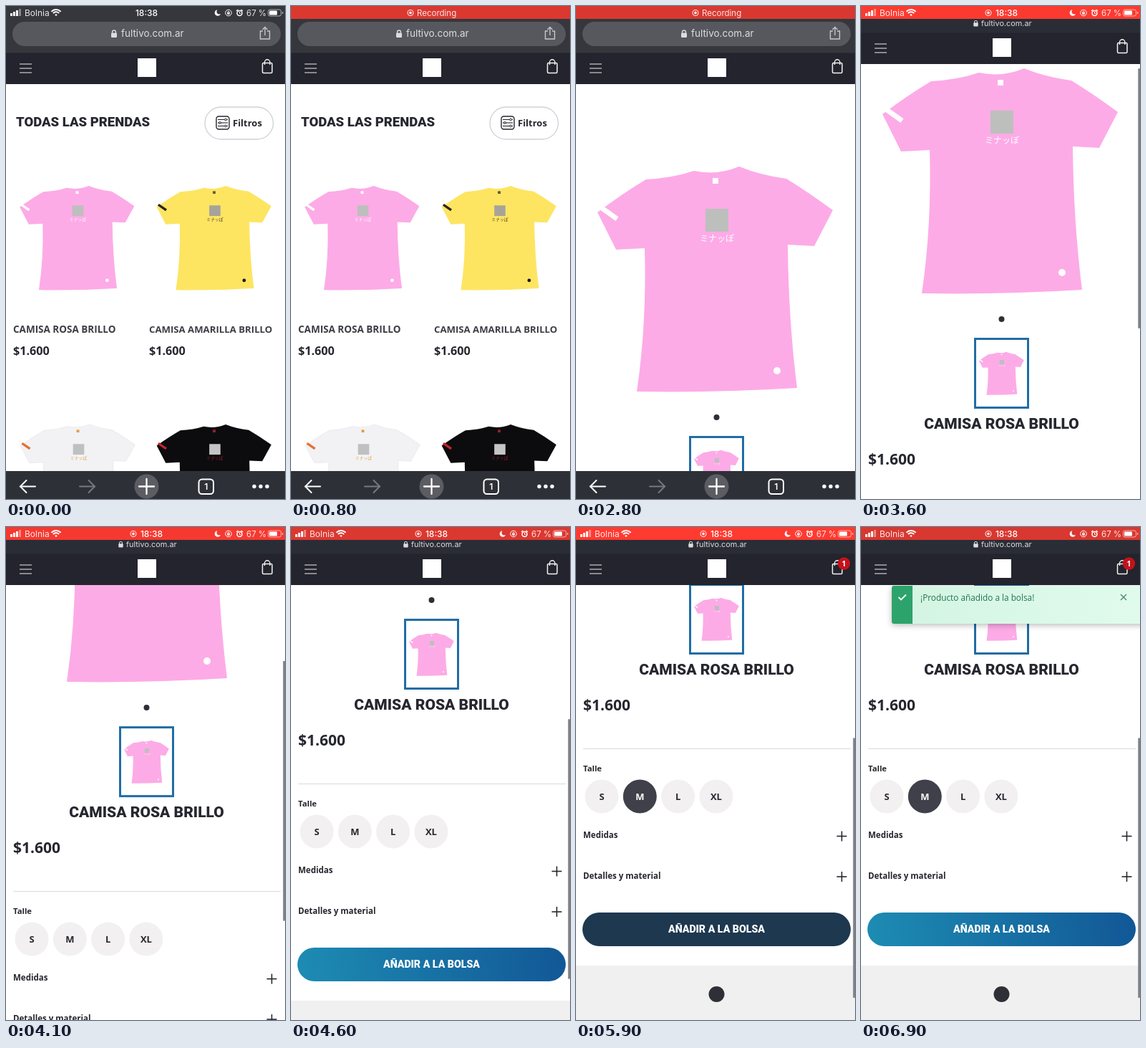
Write an HTML page with a canvas that moves like this. It is 390 px wide and 688 px high and loops after 7 s.

```html
<!DOCTYPE html>
<html lang="es">
<head>
<meta charset="utf-8">
<title>Tienda</title>
<style>
html, body { margin: 0; width: 100%; height: 100%; overflow: hidden; background: #fff; }
canvas { display: block; width: 390px; height: 688px; }
</style>
</head>
<body>
<canvas id="stage"></canvas>
<script>
const W = 390, H = 688, LOOP = 7000;
const canvas = document.getElementById('stage');
const dpr = window.devicePixelRatio || 1;
canvas.width = W * dpr;
canvas.height = H * dpr;
const c = canvas.getContext('2d');

const INK = '#26272f', BAR = '#35373d', HEADER = '#23242d', SOFT = 'rgba(255,255,255,.87)';
const UI = 'Inter, sans-serif', BODY = '"Open Sans", sans-serif';
const HEAD = 'Roboto, sans-serif', KANA = '"Noto Sans CJK JP", "Noto Sans CJK", sans-serif';

const times = {
  recording: 600, blank: 1400, product: 2300, clock: 3150,
  size: 5200, press: 5600, badge: 5800, release: 6100, toast: 6200
};
const scrolls = [[2950, 3500, 137], [3700, 4450, 335], [4700, 5050, 49]];

const clamp = v => Math.max(0, Math.min(1, v));
const mix = (a, b, k) => a + (b - a) * k;
const ease = (t, from, to) => {
  const k = clamp((t - from) / (to - from));
  return k * k * (3 - 2 * k);
};

function rect(x, y, w, h, color) {
  c.fillStyle = color;
  c.fillRect(x, y, w, h);
}
function round(x, y, w, h, r, fill, stroke, width = 1) {
  c.beginPath();
  c.roundRect(x, y, w, h, r);
  paint(fill, stroke, width);
}
function disc(x, y, r, fill, stroke, width = 1) {
  c.beginPath();
  c.arc(x, y, r, 0, Math.PI * 2);
  paint(fill, stroke, width);
}
function paint(fill, stroke, width) {
  if (fill) { c.fillStyle = fill; c.fill(); }
  if (stroke) { c.strokeStyle = stroke; c.lineWidth = width; c.stroke(); }
}
function line(color, width, ...points) {
  c.beginPath();
  points.forEach(([x, y], i) => i ? c.lineTo(x, y) : c.moveTo(x, y));
  paint(null, color, width);
}
function text(str, x, y, font, color = INK, align = 'left') {
  c.font = font;
  c.fillStyle = color;
  c.textAlign = align;
  c.textBaseline = 'alphabetic';
  c.fillText(str, x, y);
}
function plus(x, y, r, color, width) {
  line(color, width, [x - r, y], [x + r, y]);
  line(color, width, [x, y - r], [x, y + r]);
}

// Origin: centre of the garment, at the top of its collar.
function shirt(x, y, scale, look, scaleY = scale) {
  c.save();
  c.translate(x, y);
  c.scale(scale, scaleY);
  c.beginPath();
  c.moveTo(-30, 7);
  c.quadraticCurveTo(2, 14, 33, 1);
  c.quadraticCurveTo(62, 13, 99, 18);
  c.quadraticCurveTo(130, 37, 164, 62);
  c.lineTo(138, 112);
  c.lineTo(101, 110);
  c.quadraticCurveTo(102, 215, 114, 310);
  c.quadraticCurveTo(0, 317, -110, 315);
  c.quadraticCurveTo(-96, 220, -99, 115);
  c.lineTo(-139, 117);
  c.lineTo(-165, 65);
  c.quadraticCurveTo(-129, 38, -97, 19);
  c.quadraticCurveTo(-60, 17, -30, 7);
  c.closePath();
  paint(look.cloth, look.edge, 1.5);
  rect(-4, 17, 8, 8, look.tag);
  rect(-14, 60, 32, 32, look.mark);
  text('ミナッぽ', 2, 106, '500 12px ' + KANA, look.kana, 'center');
  c.save();
  c.translate(-149, 66);
  c.rotate(0.62);
  rect(-14, -3.5, 28, 7, look.sleeve);
  c.restore();
  disc(86, 286, 5, look.dot);
  c.restore();
}

const pink = {
  cloth: '#fcabe7', tag: '#fff', mark: '#bdbfbd',
  kana: '#fff', sleeve: '#fff', dot: '#fff'
};
const yellow = {
  cloth: '#fde562', tag: '#655b29', mark: '#a6a39b',
  kana: '#513e25', sleeve: '#29251e', dot: '#1d1c1a'
};
const white = {
  cloth: '#f2f2f5', edge: '#e6e6ea', tag: '#e0a13d', mark: '#bfc0c2',
  kana: '#e3a145', sleeve: '#e37035', dot: '#444'
};
const black = {
  cloth: '#0c0c0f', tag: '#9c2028', mark: '#c5c5c6',
  kana: '#9d1821', sleeve: '#c3242c', dot: '#fff'
};

function listPage() {
  text('TODAS LAS PRENDAS', 14, 168, '900 18.5px ' + HEAD);
  round(278, 141, 95.5, 45, 22.5, '#fff', '#cfd0d7', 1.3);
  round(294, 154, 18, 18, 3.5, null, INK, 1.4);
  [[158.5, 307], [163, 299], [167.5, 307]].forEach(([y, knob]) => {
    line(INK, 1.1, [296, y], [310, y]);
    disc(knob, y, 1.4, '#fff', INK, 1);
  });
  text('Filtros', 317, 168, '700 13px ' + BODY);

  const wide = 0.487, tall = 0.463;
  shirt(99.5, 250.5, wide, pink, tall);
  shirt(291, 250.5, wide, yellow, tall);
  text('CAMISA ROSA BRILLO', 10, 456, '700 13.5px ' + BODY, '#3d3e46');
  text('CAMISA AMARILLA BRILLO', 200, 456, '700 13.2px ' + BODY, '#3d3e46');
  text('$1.600', 10, 487, '700 16.2px ' + BODY);
  text('$1.600', 200, 487, '700 16.2px ' + BODY);
  shirt(100.5, 583.5, wide, white, tall);
  shirt(291, 583.5, wide, black, tall);
}

function productPage(t, scroll) {
  c.save();
  c.translate(0, -scroll);
  shirt(195, 223, 1, pink);
  disc(196.5, 574, 4, '#2e2f36');
  rect(158, 600, 77, 99, '#216da5');
  rect(161, 603, 71, 93, '#fff');
  shirt(196.5, 619.5, 0.191, pink);
  text('CAMISA ROSA BRILLO', 196.5, 727, '900 21px ' + HEAD, INK, 'center');
  text('$1.600', 10, 777, '700 21px ' + BODY);
  rect(10, 830, 374, 1, '#d9d9dc');

  text('Talle', 10, 862, '700 11.3px ' + BODY);
  ['S', 'M', 'L', 'XL'].forEach((label, i) => {
    const x = 36 + i * 53.3, chosen = label === 'M' && t >= times.size;
    disc(x, 897, 23.5, chosen ? '#3f4049' : '#f2f0f0');
    text(label, x, 902, '700 13px ' + BODY, chosen ? '#fff' : INK, 'center');
  });
  [['Medidas', 951], ['Detalles y material', 1007.5]].forEach(([label, y]) => {
    text(label, 10, y + 4, '700 11.5px ' + BODY);
    plus(371.5, y + 1.5, 7, INK, 1.6);
  });

  const blue = c.createLinearGradient(9, 1106, 384, 1059);
  blue.addColorStop(0, '#1d8cb3');
  blue.addColorStop(1, '#125796');
  const pressed = t >= times.press && t < times.release;
  round(9, 1059, 375, 47, 23.5, pressed ? '#1e3850' : blue);
  text('AÑADIR A LA BOLSA', 196.5, 1086.5, '900 14.2px ' + HEAD, '#fff', 'center');
  rect(0, 1133, W, 200, '#f1f0f0');
  disc(196.5, 1173, 11, '#2f3037');
  c.restore();
}

function toast(t) {
  if (t < times.toast) return;
  const x = mix(W, 43, ease(t, times.toast, times.toast + 350));
  c.save();
  c.shadowColor = 'rgba(0,0,0,.28)';
  c.shadowBlur = 8;
  c.shadowOffsetY = 2;
  const mint = c.createLinearGradient(x, 0, x + 347, 0);
  mint.addColorStop(0, '#d3f4e2');
  mint.addColorStop(1, '#e0fbec');
  round(x, 82, 355, 53, 3, mint);
  c.restore();
  round(x, 82, 29, 53, [3, 0, 0, 3], '#2ca36b');
  line('#fff', 1.8, [x + 9.5, 98], [x + 13, 101.5], [x + 20, 94.5]);
  text('¡Producto añadido a la bolsa!', x + 40, 102.5, '400 11.8px ' + BODY, '#23744f');
  const cx = x + 324;
  line('#528b70', 1.5, [cx - 4, 94], [cx + 4, 102]);
  line('#528b70', 1.5, [cx + 4, 94], [cx - 4, 102]);
}

function padlock(x, y, s) {
  c.save();
  c.translate(x, y);
  c.scale(s, s);
  round(-4, -1, 8, 6.5, 1.2, '#dcdde0');
  c.beginPath();
  c.arc(0, -2, 2.5, Math.PI, 0);
  c.lineTo(2.5, 0);
  c.moveTo(-2.5, -2);
  c.lineTo(-2.5, 0);
  paint(null, '#dcdde0', 1.3);
  c.restore();
}

function addressBar(k) {
  rect(0, 18, W, 48 - 28 * k, k < 1 ? BAR : '#2b2d36');
  c.globalAlpha = 1 - k;
  round(9, 22, 375, 34 - 24 * k, 17 - 12 * k, '#56585d');
  const y = 38 - 14 * k;
  line('#c7c8cb', 1.4, [359, y - 3], [355.5, y - 3], [355.5, y + 8], [368.5, y + 8], [368.5, y - 3], [365, y - 3]);
  line('#c7c8cb', 1.4, [362, y + 3], [362, y - 8]);
  line('#c7c8cb', 1.4, [358.5, y - 5], [362, y - 8.5], [365.5, y - 5]);
  c.globalAlpha = 1;
  padlock(mix(151, 160.5, k), mix(38.5, 24, k), mix(1, 0.8, k));
  text('fultivo.com.ar', mix(161, 168, k), mix(43, 28, k), `400 ${mix(13.5, 10.9, k)}px ${UI}`, '#dcdde0');
}

function header(t, k) {
  c.save();
  c.translate(0, -28 * k);
  rect(0, 65.5, W, 43.5, HEADER);
  [81, 87, 93].forEach(y => line('#dcdde0', 1.1, [19, y], [36, y]));
  rect(184, 73, 26, 26, '#fff');
  round(358.5, 79.5, 13.5, 14, 1.5, null, '#f2f2f3', 1.5);
  c.beginPath();
  c.moveTo(361.5, 82);
  c.lineTo(361.5, 78.5);
  c.arc(365.2, 78.5, 3.7, Math.PI, 0);
  c.lineTo(368.9, 82);
  paint(null, '#f2f2f3', 1.4);
  if (t >= times.badge) {
    disc(374.5, 79, 8.7, '#c5121b');
    text('1', 374.5, 83, '700 10.5px ' + BODY, '#fff', 'center');
  }
  c.restore();
}

function recordIcon(x) {
  disc(x, 9.5, 4, null, SOFT, 1.1);
  disc(x, 9.5, 1.9, SOFT);
}

function statusIcons(bg, clockX) {
  [4, 6, 8, 10].forEach((h, i) =>
    rect(6 + i * 4, 14 - h, 3, h, i < 3 ? '#fff' : 'rgba(255,255,255,.4)'));
  text('Bolnia', 26, 13.8, '400 12px ' + UI, SOFT);
  [2.5, 5.7, 9].forEach(r => {
    c.beginPath();
    c.arc(70, 14, r, -Math.PI * 0.76, -Math.PI * 0.24);
    if (r < 3) { c.lineTo(70, 14); paint('#fff'); } else paint(null, '#fff', 1.9);
  });
  text('18:38', clockX, 13.8, '500 12px ' + UI, '#fff', 'center');
  disc(296, 9.5, 4.3, '#fff');
  disc(298.3, 7.8, 3.8, bg);
  disc(311, 9.5, 4.3, null, '#fff', 1);
  rect(309.3, 8.8, 3.4, 3, '#fff');
  disc(311, 8.7, 1.3, null, '#fff', 0.8);
  disc(326.5, 10, 3.5, null, '#fff', 1.5);
  line('#fff', 1.5, [322, 7], [324.5, 5]);
  line('#fff', 1.5, [328.5, 5], [331, 7]);
  line('#fff', 1, [326.5, 8], [326.5, 10.3], [328.3, 10.3]);
  text('67 %', 336, 13.8, '400 11.5px ' + UI, SOFT);
  round(366.5, 5, 18, 9, 2.5, null, 'rgba(255,255,255,.6)', 1);
  round(368, 6.5, 11, 6, 1.2, '#fff');
  rect(386, 8, 1.3, 3, 'rgba(255,255,255,.6)');
}

function statusBar(t) {
  const glow = 0.5 + 0.5 * Math.cos((t - 1650) / 2100 * Math.PI * 2);
  const red = `rgb(${mix(216, 255, glow)},${mix(56, 58, glow)},48)`;
  const bg = t < times.recording ? BAR : red;
  rect(0, 0, W, 18, bg);
  if (t < times.recording) {
    statusIcons(bg, 196.5);
  } else if (t < times.clock) {
    recordIcon(167);
    text('Recording', 176, 13.5, '400 11.5px ' + UI, SOFT);
  } else {
    recordIcon(178);
    statusIcons(bg, 203.5);
  }
}

function toolbar(k) {
  if (k >= 1) return;
  c.save();
  c.translate(0, 39 * k);
  rect(0, 649, W, 39, '#2e3037');
  c.lineCap = 'round';
  const arrow = (x, dir, color) => {
    line(color, 2, [x - 10.5, 670.5], [x + 10.5, 670.5]);
    const tip = x + dir * 10.5;
    line(color, 2, [tip - dir * 8.5, 662], [tip, 670.5], [tip - dir * 8.5, 679]);
  };
  arrow(30.5, -1, '#fff');
  arrow(113.5, 1, '#777980');
  disc(196.5, 670.5, 17, '#5b5d63');
  plus(196.5, 670.5, 10.5, '#fff', 2.3);
  round(269.5, 660.5, 20.5, 20.5, 4.5, null, '#fff', 2);
  text('1', 279.7, 675, '600 12px ' + UI, '#fff', 'center');
  [347, 356, 365].forEach(x => disc(x, 670.5, 2.7, '#fff'));
  c.restore();
}

function draw(t) {
  c.setTransform(dpr, 0, 0, dpr, 0, 0);
  rect(0, 0, W, H, '#fff');
  const scroll = scrolls.reduce((sum, [from, to, dist]) => sum + dist * ease(t, from, to), 0);
  const collapse = clamp(scroll / 70);

  if (t < times.blank) listPage();
  else if (t >= times.product) productPage(t, scroll);

  if (scroll > 0) {
    round(387.3, 87 + Math.max(0, scroll - 137) * 0.54, 2.7, 363, 1.3, '#808186');
  }
  toast(t);
  addressBar(collapse);
  header(t, collapse);
  statusBar(t);
  toolbar(collapse);
}

const start = performance.now();
function tick() {
  draw((performance.now() - start) % LOOP);
  requestAnimationFrame(tick);
}
tick();
</script>
</body>
</html>
```
